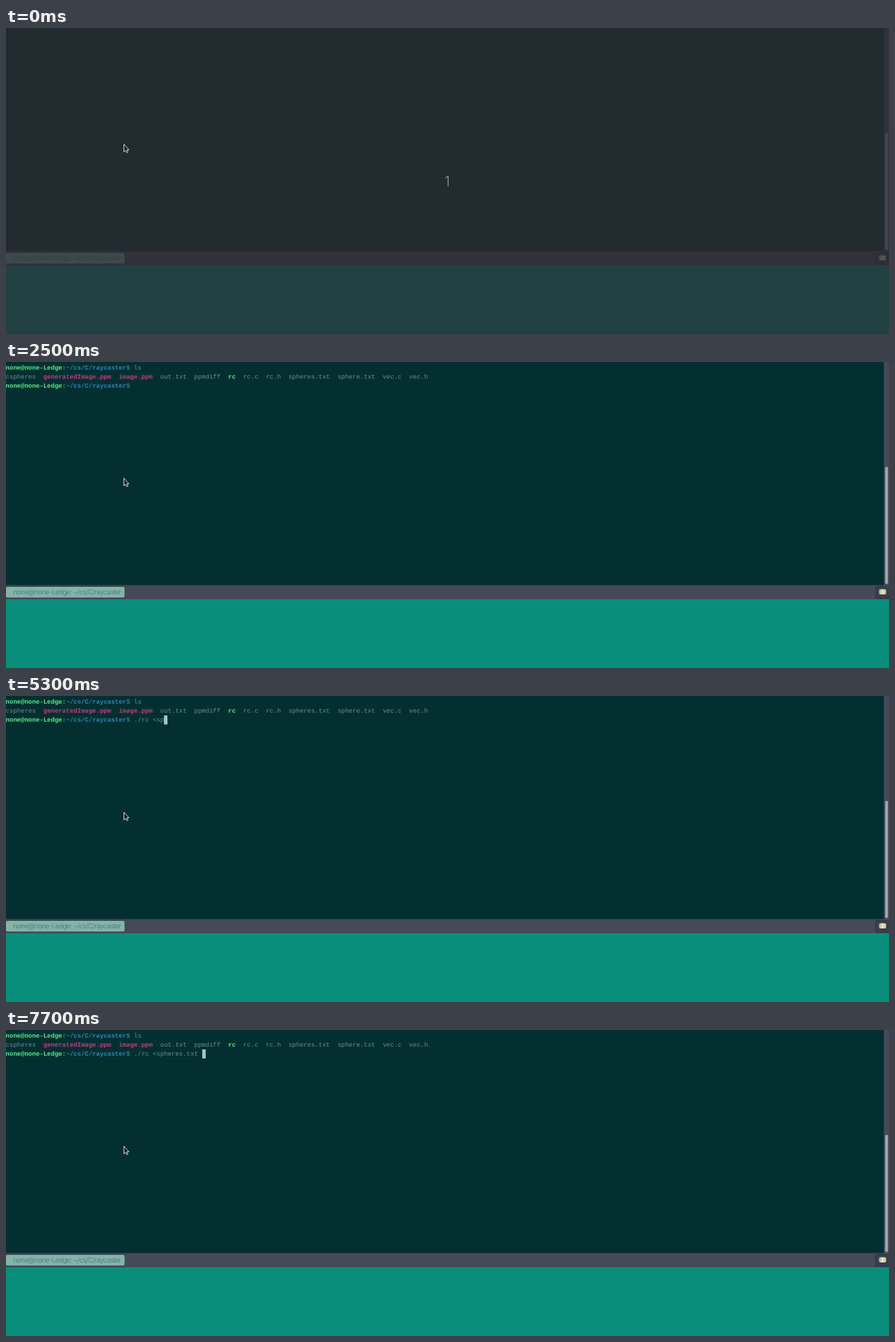
Animation of 1269 by 441 pixels, one loop 8 s. Source, as an HTML page with a canvas:

```html
<!DOCTYPE html>
<html lang="en">
<head>
<meta charset="utf-8">
<title>Terminal</title>
<style>
  html, body { margin: 0; width: 100%; height: 100%; overflow: hidden; background: #0a8e7c; }
  canvas { display: block; }
</style>
</head>
<body>
<canvas width="1269" height="441"></canvas>
<script>
const ctx = document.querySelector('canvas').getContext('2d');
const LOOP = 8000, SIZE = 9.03, CELL = SIZE * 0.6, LINE = 13;
const GREEN = '#58ee88', BLUE = '#2c87b8', PINK = '#c23c82', GREY = '#6b8f8d';
const HOST = 'none@none-Ledge', PATH = '~/cs/C/raycaster';

const FILES = [
  ['cspheres'], ['generatedImage.ppm', PINK], ['image.ppm', PINK], ['out.txt'],
  ['ppmdiff'], ['rc', GREEN], ['rc.c'], ['rc.h'], ['spheres.txt'],
  ['sphere.txt'], ['vec.c'], ['vec.h']
];
const LIST = 'ls', COMMAND = './rc <spheres.txt ';
// Time at which each character appears.
const LIST_KEYS = [1600, 1700];
const COMMAND_KEYS = [3400, 3500, 3700, 4000, 4200, 4500, 5200, 5300, 5500,
  5600, 5700, 5900, 6100, 6500, 7200, 7300, 7300, 7700];
const PROMPT_AT = 900, OUTPUT_AT = 1800;
const BLINKS = [[1500, 1600], [2500, 3400], [5100, 5200], [7000, 7200]];

function box(x, y, w, h, color, radius = 0) {
  ctx.fillStyle = color;
  ctx.beginPath();
  ctx.roundRect(x, y, w, h, radius);
  ctx.fill();
}

function write(text, col, row, color = GREY, bold = false) {
  ctx.font = `${bold ? 'bold ' : ''}${SIZE}px "Liberation Mono", monospace`;
  ctx.fillStyle = color;
  ctx.fillText(text, col * CELL - 0.4, 11 + row * LINE);
  return col + text.length;
}

function prompt(row) {
  let col = write(HOST, 0, row, GREEN, true);
  col = write(':', col, row, '#82aaa6', true);
  col = write(PATH, col, row, BLUE, true);
  return write('$', col, row, '#5287a5') + 1;
}

function inputLine(text, keys, row, t) {
  const typed = text.slice(0, keys.filter(k => k <= t).length);
  return write(typed, prompt(row), row);
}

function terminal(t) {
  if (t < PROMPT_AT) return;
  let row = 0;
  let col = inputLine(LIST, LIST_KEYS, row, t);
  if (t >= OUTPUT_AT) {
    col = 0;
    for (const [name, color] of FILES) col = write(name, col, 1, color, !!color) + 2;
    row = 2;
    col = inputLine(COMMAND, COMMAND_KEYS, row, t);
  }
  if (!BLINKS.some(([off, on]) => t >= off && t < on))
    box(Math.round(col * CELL - 0.2), 2 + row * LINE, 5, LINE, '#a0c6c0');
}

function desktop() {
  box(0, 0, 1269, 441, '#0a8e7c');
  box(0, 0, 1261, 322, '#032f31');
  box(1261, 0, 8, 322, '#444a5a');
  box(1261, 0, 1, 322, '#26333f');
  box(1263.5, 151, 4, 169, '#a2a8b4', 2);
  box(0, 321.5, 1269, 20.5, '#444a5a');

  box(0, 323, 171.5, 17.5, '#363d4b', 2);
  box(0, 324, 170.5, 15.5, '#82b4aa', 2);
  ctx.font = '300 10px Inter, sans-serif';
  ctx.letterSpacing = '-0.06em';
  ctx.fillStyle = '#447571';
  ctx.fillText(`${HOST}: ${PATH}`, 10.5, 335);
  ctx.letterSpacing = '0px';

  box(1249.5, 323, 20, 18, '#2c3340', 2);
  box(1250.5, 324, 19, 16, '#373e4c', 2);
  const shine = ctx.createLinearGradient(1254, 0, 1265, 0);
  shine.addColorStop(0, '#9a9d9c');
  shine.addColorStop(0.5, '#e6e6d6');
  shine.addColorStop(1, '#c9c64a');
  box(1254.5, 327.5, 10.5, 7.5, shine, 2);
}

function countdown() {
  ctx.globalAlpha = 0.77;
  box(0, 0, 1269, 441, '#2a2a31');
  ctx.globalAlpha = 1;
  ctx.font = '200 20px Inter, sans-serif';
  ctx.fillStyle = '#c0c6c9';
  ctx.textAlign = 'center';
  ctx.fillText('1', 634, 228);
  ctx.textAlign = 'left';
}

const arrow = new Path2D('M169.5 167.5V178.5L171.9 176.3 173.6 179.6 175.3 178.8 173.7 175.5H176.6Z');

function pointer() {
  ctx.fillStyle = '#0b1416';
  ctx.fill(arrow);
  ctx.strokeStyle = '#eef2f2';
  ctx.lineWidth = 0.9;
  ctx.stroke(arrow);
}

function draw() {
  const t = performance.now() % LOOP;
  ctx.textRendering = 'geometricPrecision';
  desktop();
  terminal(t);
  if (t < 400) countdown();
  pointer();
  requestAnimationFrame(draw);
}
draw();
</script>
</body>
</html>
```
